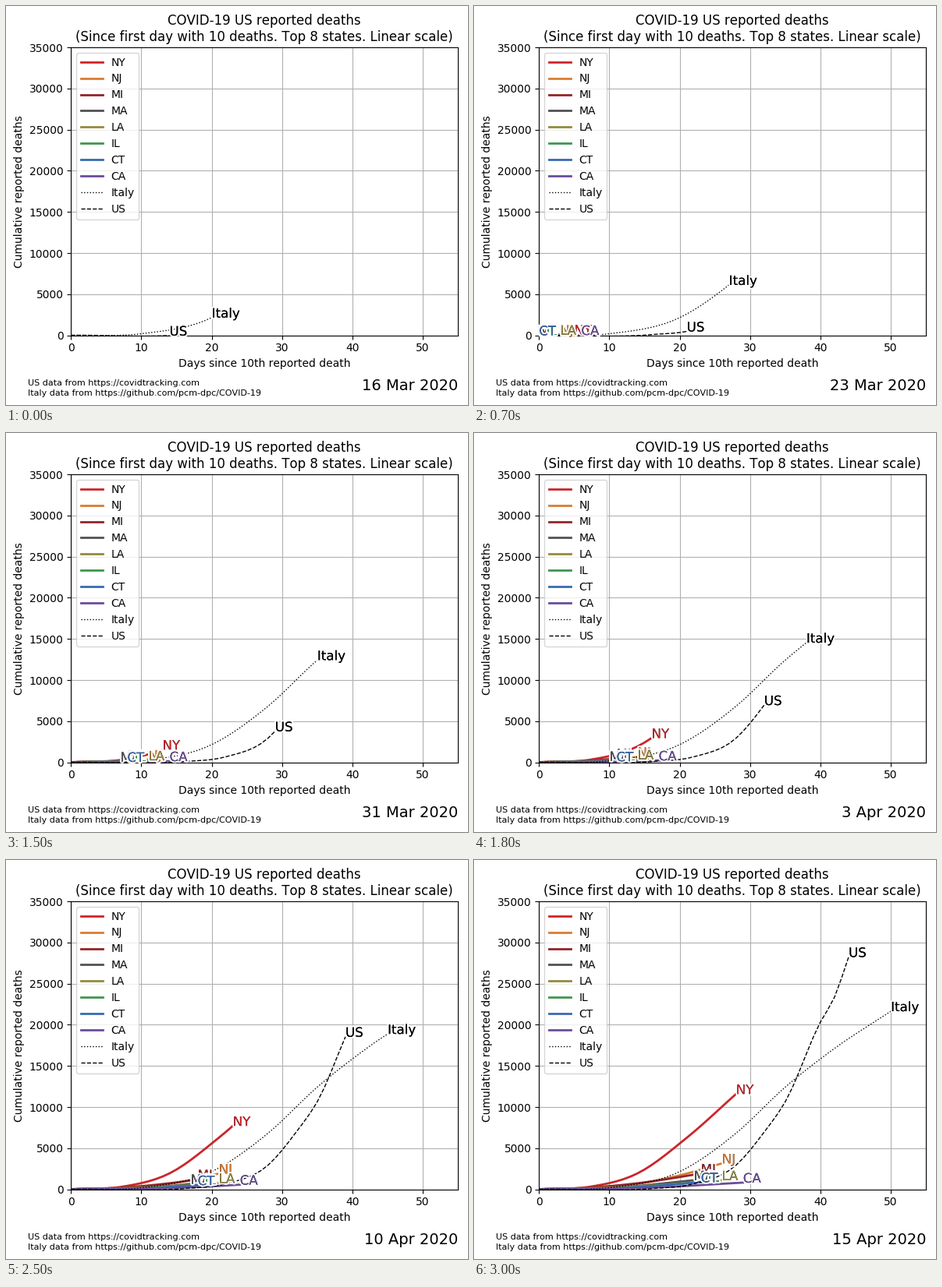
These frames come from a looping animation (592 px wide and 512 px high, 5500 ms). A matplotlib script:

```python
import matplotlib.pyplot as plt
import matplotlib.patheffects as pe
import numpy as np
from matplotlib.animation import FuncAnimation

WIDTH, HEIGHT, DPI = 592, 512, 100
LAST_DAY = 30       # 16 Mar to 15 Apr
FRAMES = 55         # the last day is held until the loop ends

plt.rcParams["font.family"] = "DejaVu Sans"
plt.rcParams["text.kerning_factor"] = 6     # whole-pixel glyph spacing

LABEL_EFFECTS = [
    pe.Stroke(linewidth=3, foreground="white"),
    pe.PathPatchEffect(facecolor="black", linewidth=0),
    pe.Normal(),
]


def smooth_curve(x, points):
    """Cubic Hermite curve through a few (x, y) key points."""
    xs, ys = np.array(points, float).T
    slopes = np.gradient(ys, xs)
    i = np.clip(np.searchsorted(xs, x, side="right") - 1, 0, len(xs) - 2)
    h = xs[i + 1] - xs[i]
    t = (x - xs[i]) / h
    ease = t * t * (3 - 2 * t)
    bend = t * (1 - t) * ((1 - t) * slopes[i] - t * slopes[i + 1])
    return ys[i] + ease * (ys[i + 1] - ys[i]) + h * bend


class Series:
    """Cumulative deaths from day 0 up to the last key point."""

    def __init__(self, ax, name, color, *points, lw=2, ls="-"):
        self.name = name
        self.last = points[-1][0]
        self.deaths = smooth_curve(np.arange(self.last + 1), points)
        self.line, = ax.plot([], [], color=color, label=name, lw=lw, ls=ls)
        self.label = ax.text(0, 0, "", color=color, fontsize=12,
                             path_effects=LABEL_EFFECTS)

    def show(self, day):
        end = self.last - LAST_DAY + day
        shown = self.deaths[:max(end + 1, 0)]
        self.line.set_data(np.arange(len(shown)), shown)
        self.label.set_text(self.name if len(shown) else "")
        if len(shown):
            self.label.set_position((end, shown[-1]))


def date_text(day):
    number = 16 + day
    return f"{number} Mar 2020" if number <= 31 else f"{number - 31} Apr 2020"


fig = plt.figure(figsize=(WIDTH / DPI, HEIGHT / DPI), dpi=DPI, facecolor="white")
ax = fig.add_axes([83.25 / WIDTH, 89.38 / HEIGHT, 496 / WIDTH, 369.6 / HEIGHT])
ax.set(xlim=(0, 55), ylim=(0, 35000),
       xlabel="Days since 10th reported death",
       ylabel="Cumulative reported deaths")
ax.set_title("COVID-19 US reported deaths\n"
             "(Since first day with 10 deaths. Top 8 states. Linear scale)",
             fontsize=12)
ax.grid(True)

series = [
    Series(ax, "NY", "#cc2529", (0, 12), (7, 285), (14, 1941), (21, 6268), (28, 11586)),
    Series(ax, "NJ", "#da7c30", (0, 11), (13, 537), (20, 1700), (26, 3156)),
    Series(ax, "MI", "#922428", (0, 15), (8, 259), (15, 845), (23, 1921)),
    Series(ax, "MA", "#535154", (0, 11), (11, 216), (22, 1108)),
    Series(ax, "LA", "#948b3d", (0, 10), (13, 310), (26, 1103)),
    Series(ax, "IL", "#3e9651", (0, 10), (12, 210), (24, 948)),
    Series(ax, "CT", "#396ab1", (0, 10), (12, 165), (23, 868)),
    Series(ax, "CA", "#6b4c9a", (0, 11), (15, 171), (29, 821)),
    Series(ax, "Italy", "black", (0, 10), (10, 197), (20, 2158), (28, 6820),
           (35, 12428), (42, 17127), (50, 21645), lw=1, ls=":"),
    Series(ax, "US", "black", (0, 11), (16, 90), (22, 675), (28, 2939), (32, 6962),
           (35, 10650), (40, 20355), (42, 23371), (44, 28235), lw=1, ls="--"),
]
ax.legend(loc="upper left")

fig.text(28 / WIDTH, 10 / HEIGHT,
         "US data from https://covidtracking.com\n"
         "Italy data from https://github.com/pcm-dpc/COVID-19",
         fontsize=8, va="bottom", linespacing=1.35)
date = fig.text(579.25 / WIDTH, 19 / HEIGHT, "", fontsize=14, ha="right")


def update(frame):
    day = min(frame, LAST_DAY)
    for item in series:
        item.show(day)
    date.set_text(date_text(day))


animation = FuncAnimation(fig, update, frames=FRAMES, interval=100,
                          repeat=True, repeat_delay=0, blit=False)
plt.show()
```
